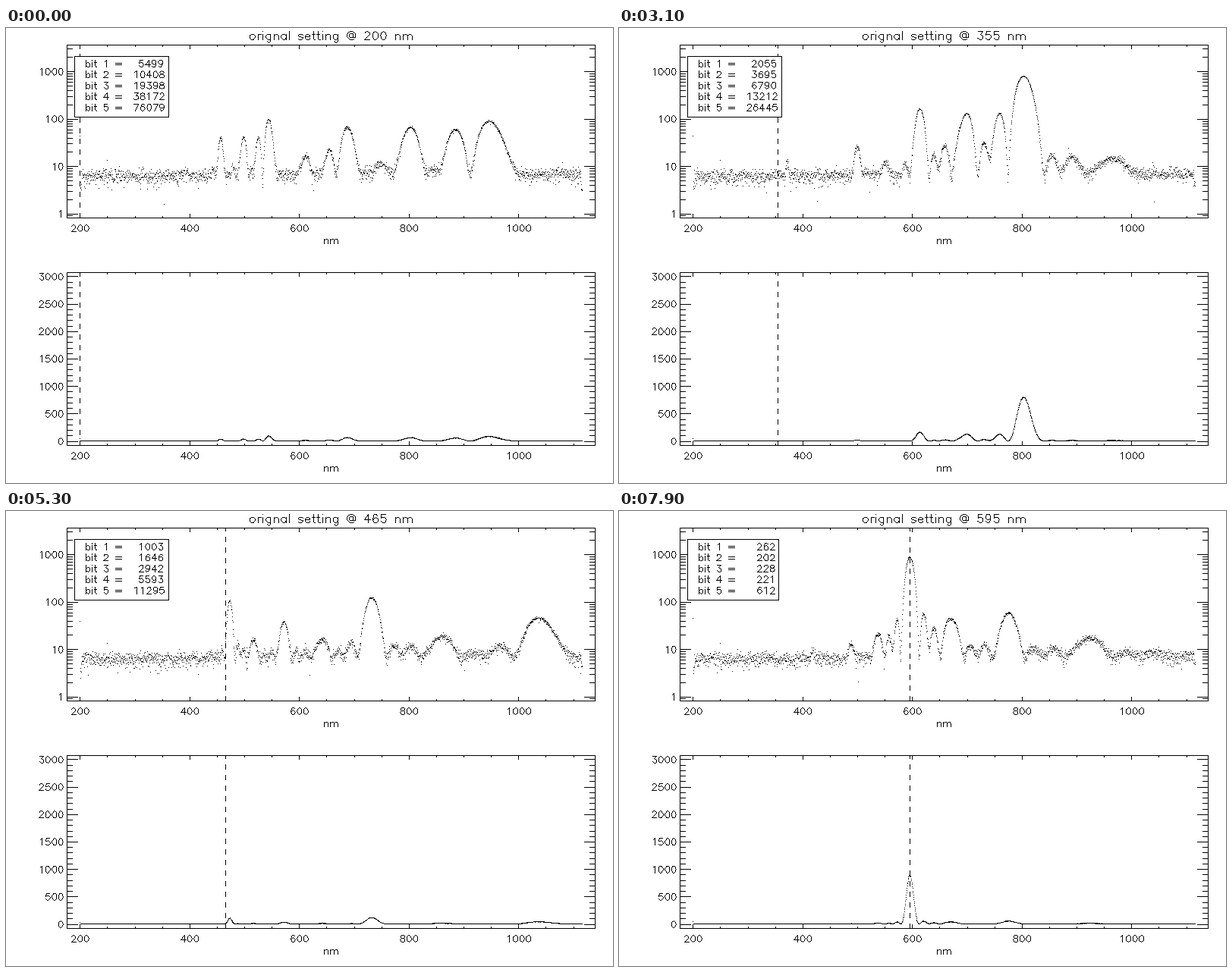
A matplotlib script for the animation above (8 s loop, 800x600 px).

```python
import numpy as np
import matplotlib.pyplot as plt
from matplotlib.animation import FuncAnimation
from matplotlib.patches import Rectangle

FRAMES, STEP = 80, 5
LEFT, RIGHT = 80, 776
TOP, LOW = (23, 251), (323, 551)
SMALL, LARGE = 0.424, 0.53
DASH = 7


# ---- stroke lettering: baseline at 0, capitals 21 units high ----
def arc(cx, cy, rx, ry, a0=0, a1=360):
    t = np.radians(np.linspace(a0, a1, 1 + max(2, round(abs(a1 - a0) / 30))))
    return list(zip(cx + rx * np.cos(t), cy + ry * np.sin(t)))


def hump(x):
    return arc(x + 5.5, 8.5, 5.5, 5.5, 165, 0) + [(x + 11, 0)]


bowl = arc(9, 7, 6, 7, 35, 325)
stem = [(4, 14), (4, 0)]
tall = [(4, 21), (4, 0)]
six = [arc(11, 10, 7, 11, 45, 180) + [(4, 6.5)], arc(10.5, 6.5, 6.5, 6.5)]

GLYPHS = {
    " ": (16, []),
    "0": (20, [arc(10, 10.5, 7, 10.5)]),
    "1": (20, [[(6, 17), (11, 21), (11, 0)]]),
    "2": (20, [arc(10, 15, 6, 6, 170, -40) + [(3, 0), (17, 0)]]),
    "3": (20, [[(5, 21), (16, 21), (10, 13)] + arc(10, 6.5, 7, 6.5, 90, -155)]),
    "4": (20, [[(13, 0), (13, 21), (3, 7), (18, 7)]]),
    "5": (20, [[(15, 21), (5, 21), (4, 12)] + arc(10, 7, 7, 7, 125, -155)]),
    "6": (20, six),
    "7": (20, [[(3, 21), (17, 21), (7, 0)]]),
    "8": (20, [arc(10, 16.5, 6, 4.5), arc(10, 6, 7, 6)]),
    "9": (20, [[(20 - x, 21 - y) for x, y in s] for s in six]),
    "=": (26, [[(4, y), (22, y)] for y in (6, 12)]),
    "@": (27, [arc(13.5, 10.5, 10.5, 10.5, -15, 310), arc(13, 10.5, 4.5, 5),
               [(18, 16)] + arc(20.75, 8, 2.75, 3, 180, 360)]),
    "a": (19, [[(15, 14), (15, 0)], bowl]),
    "b": (19, [tall, arc(10, 7, 6, 7, 145, -145)]),
    "e": (18, [[(3, 8), (15, 8)] + arc(9, 7, 6, 7, 10, 325)]),
    "g": (19, [[(15, 14)] + arc(10.5, -2, 4.5, 5, 0, -150), bowl]),
    "i": (8, [stem, [(4, 20), (4, 21)]]),
    "l": (8, [tall]),
    "m": (30, [stem, hump(4), hump(15)]),
    "n": (19, [stem, hump(4)]),
    "o": (19, [arc(9.5, 7, 6.5, 7)]),
    "r": (13, [stem, arc(10, 8, 6, 6, 180, 70)]),
    "s": (17, [arc(8.5, 10.5, 5.5, 3.5, 20, 270), arc(8.5, 3.5, 5.5, 3.5, 90, -160)]),
    "t": (12, [[(5, 21)] + arc(9, 4, 4, 4, 180, 280), [(2, 14), (9, 14)]]),
}


def width(text, size=SMALL):
    return size * sum(GLYPHS[c][0] for c in text)


def letter(text, x, y, size=SMALL, align=0.0):
    """Strokes of a text; align is 0 for left, 0.5 centre, 1 right."""
    x -= align * width(text, size)
    out = []
    for c in text:
        adv, strokes = GLYPHS[c]
        out += [[(x + size * u, y - size * v) for u, v in s] for s in strokes]
        x += size * adv
    return out


# ---- scales ----
def px(nm):
    return 97.3 + 0.7225 * (np.asarray(nm) - 200)


def py_log(v):
    return 245.57 - 62.45 * np.log10(v)


def py_lin(v):
    return 545.57 - 0.07238 * np.asarray(v)


# ---- five-stage birefringent filter, driven linearly in wavenumber (1/um) ----
AT_200 = np.array([5499, 10408, 19398, 38172, 76079])
AT_595 = np.array([262, 201.7, 228, 221, 612])
DRIVE = (AT_200 - AT_595) / (1000 / 200 - 1000 / 595)
RETARD = DRIVE / 2246          # waves per unit wavenumber
LEAK = np.array([0.08, 0.08, 0.08, 0.01, 0])

NM = np.linspace(200, 1116, 2048)
NU = 1000 / NM
PHASE = NU + 0.08 * (NU - 1.4) ** 2 - 0.0063
RESPONSE = 1.2 / (1 + np.exp((555 - NM) / 35)) / (1 + np.exp((NM - 1010) / 25))


def bits(setting):
    return np.rint(AT_595 + DRIVE * (1000 / setting - 1000 / 595)).astype(int)


def signal(setting):
    turn = np.pi * np.outer(RETARD, 1000 / setting - PHASE)
    leak = LEAK[:, None]
    return 980 * RESPONSE * np.prod(leak + (1 - leak) * np.cos(turn) ** 2, axis=0)


def spectrum(i):
    rng = np.random.default_rng(700 + i)
    s = signal(200 + STEP * i)
    spread = np.sqrt(1.3 + 0.05 * s) * np.where(rng.random(NM.size) < 0.015, 2.2, 1)
    v = s + 6.2 + 0.6 * np.clip((NM - 550) / 150, 0, 1) + spread * rng.normal(size=NM.size)
    v[:6] *= 0.65
    v[-6:] *= 0.65
    # two hot pixels
    v[0] = 42 + 5 * rng.normal()
    v[np.searchsorted(NM, 249.5)] = 13.5
    return np.maximum(v, 1.6)


# ---- stage ----
fig = plt.figure(figsize=(8, 6), dpi=100, facecolor="white")
ax = fig.add_axes([0, 0, 1, 1])
ax.set_xlim(-0.25, 799.75)
ax.set_ylim(599.75, -0.25)
ax.axis("off")


def pixels(z):
    return ax.plot([], [], ",", color="black", antialiased=False, zorder=z)[0]


def trace(line, strokes):
    """Walk every stroke pixel by pixel."""
    runs = []
    for s in strokes:
        p = np.rint(np.asarray(s, float))
        for a, b in zip(p[:-1], p[1:]):
            n = int(np.abs(b - a).max())
            runs.append(np.rint(np.linspace(a, b, n + 1)))
    line.set_data(*np.concatenate(runs).T)


def frame_box(y0, y1):
    out = [[(LEFT, y0), (RIGHT, y0), (RIGHT, y1), (LEFT, y1), (LEFT, y0)]]
    for nm in range(200, 1101, 50):
        x, n = px(nm), 2 if nm % 200 else 5
        out += [[(x, y0), (x, y0 + n)], [(x, y1), (x, y1 - n)]]
        if nm % 200 == 0:
            out += letter(str(nm), x, y1 + 18, align=0.5)
    return out + letter("nm", 428, y1 + 34, align=0.5)


def y_tick(y, label=""):
    n = 14 if label else 7
    out = [[(LEFT, y), (LEFT + n, y)], [(RIGHT, y), (RIGHT - n, y)]]
    return out + letter(label, 76, y + 4.4, align=1)


static = frame_box(*TOP) + frame_box(*LOW) + y_tick(py_log(0.9))
for e in range(4):
    static += y_tick(py_log(10 ** e), str(10 ** e))
    for m in range(2, 10 if e < 3 else 4):
        static += y_tick(py_log(m * 10 ** e))
for v in range(0, 3001, 100):
    static += y_tick(py_lin(v), "" if v % 500 else str(v))
trace(pixels(2), static)

dots, dashes, words = pixels(2), pixels(2), pixels(5)
panel = Rectangle((90, 37), 124, 80, fc="white", ec="black", lw=0.72,
                  antialiased=False, zorder=4)
ax.add_patch(panel)


def draw(i):
    setting = 200 + STEP * i
    v = spectrum(i)
    dots.set_data(np.tile(np.rint(px(NM)), 2),
                  np.rint(np.concatenate([py_log(v), py_lin(v)])))

    x = px(setting)
    trace(dashes, [[(x, y), (x, max(y - DASH + 1, y0))]
                   for y0, y1 in (TOP, LOW) for y in range(y1, y0, -2 * DASH)])

    rows = [f"bit {k} ={b:7d}" for k, b in enumerate(bits(setting), 1)]
    strokes = letter(f"orignal setting @ {setting} nm", 428, 16, LARGE, 0.5)
    for k, row in enumerate(rows):
        strokes += letter(row, 103.7, 52 + 14.4 * k)
    trace(words, strokes)
    panel.set_width(np.floor(103.7 + max(map(width, rows)) + 5) - 90)
    return dots, dashes, words, panel


anim = FuncAnimation(fig, draw, frames=FRAMES, interval=100, repeat=True,
                     repeat_delay=0, blit=False)
plt.show()
```
